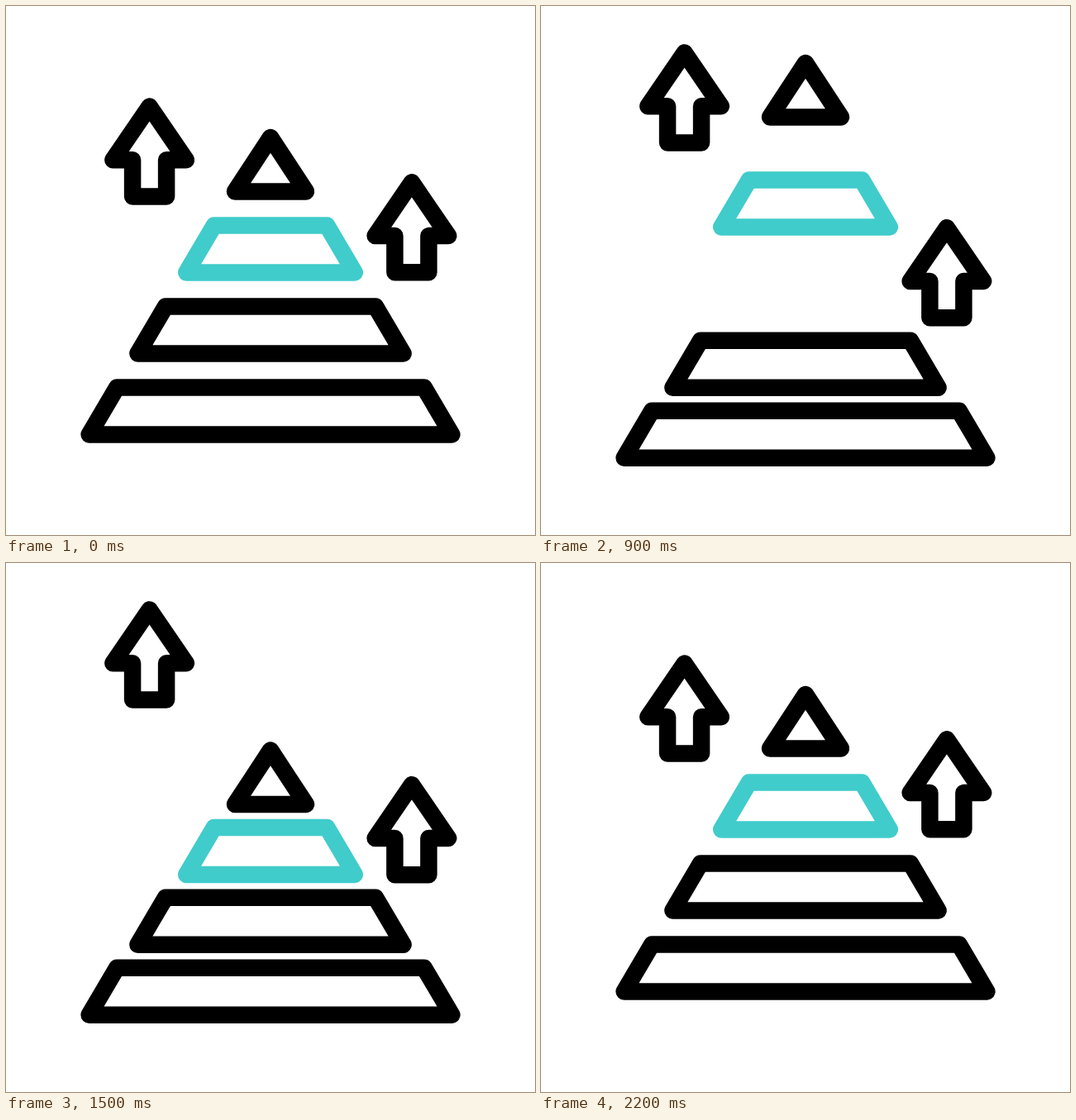
An HTML page that plays this animation: 640x640 px, repeating every 2.4 s.

```html
<!DOCTYPE html>
<html lang="en">
<head>
<meta charset="utf-8">
<title>Pyramid levels</title>
<style>
  html, body { margin: 0; width: 100%; height: 100%; overflow: hidden; background: #fff; }
  svg { display: block; width: 100%; height: 100%; }
  path { fill: none; stroke: #000; stroke-width: 20.5; stroke-linejoin: round; stroke-linecap: round; }
  .teal { stroke: #40cccb; }
</style>
</head>
<body>
<svg viewBox="0 0 640 640"></svg>
<script>
const LOOP = 2400, STEP = 20, FALL = 260, HOP = -25;
const svg = document.querySelector("svg");

function addPath(d, teal) {
  const el = document.createElementNS("http://www.w3.org/2000/svg", "path");
  el.setAttribute("d", d);
  if (teal) el.setAttribute("class", "teal");
  return svg.appendChild(el);
}

// Slabs widen evenly from the second level down.
function slab(level) {
  const bottom = 43 + 58.8 * level, top = bottom - 33.6, y = 167.5 + 98 * level;
  return `M${320 - top} ${y}H${320 + top}L${320 + bottom} ${y + 57}H${320 - bottom}Z`;
}

// Each level rises (or sinks) by `rise`, then falls onto the stack at `fall`.
const levels = [
  { rise: -90, fall: 1220 },
  { rise: -55, fall: 940 },
  { rise: -17.3, fall: 600 },
  { rise: 28.2, fall: 600 }
].map((level, i) => ({
  ...level,
  stack: 67.5 - 13.1 * i,
  el: addPath(i ? slab(i) : "M320 159L363 224.5H277Z", i === 1)
}));

const ARROW = "M0 0L44.3 64.8H20.5V109H-20.5V64.8H-44.3Z";
const arrows = [
  { x: 173.6, y: 121.5, sway: -83 },
  { x: 490.9, y: 213.3, sway: 70 }
].map(arrow => ({ ...arrow, el: addPath(ARROW) }));

// Inner end of each sparkle and its outward direction in degrees.
const sparks = [
  { x: 118.3, y: 378.5, angle: 180 },
  { x: 136, y: 341, angle: 225 },
  { x: 399, y: 151, angle: 292 },
  { x: 427, y: 182, angle: 338 }
].map(({ x, y, angle }) => {
  const el = addPath("", true);
  el.setAttribute("transform", `translate(${x} ${y}) rotate(${angle})`);
  return el;
});

// Eased progress from 0 to 1 between two times.
function ease(t, from, to) {
  const p = Math.min(1, Math.max(0, (t - from) / (to - from)));
  return p * p * (3 - 2 * p);
}

const move = (el, x, y) => el.setAttribute("transform", `translate(${x} ${y.toFixed(2)})`);

function draw(t) {
  for (const { el, rise, fall, stack } of levels) {
    move(el, 0,
      rise * ease(t, 200, 600) +
      (stack - rise) * ease(t, fall, fall + FALL) +
      (HOP - stack) * ease(t, 1800, 2040) -
      HOP * ease(t, 2040, 2200));
  }

  const swing = ease(t, 200, 1200) - ease(t, 1200, 2200);
  for (const { el, x, y, sway } of arrows) move(el, x, y + sway * swing);

  const head = 34 * ease(t, 1800, 2000), tail = 34 * ease(t, 1920, 2160);
  for (const el of sparks) el.setAttribute("d", head > tail ? `M${tail} 0H${head}` : "");
}

const start = performance.now();
function tick() {
  const t = (performance.now() - start) % LOOP;
  draw(Math.floor(t / STEP) * STEP);
  requestAnimationFrame(tick);
}
draw(0);
requestAnimationFrame(tick);
</script>
</body>
</html>
```
